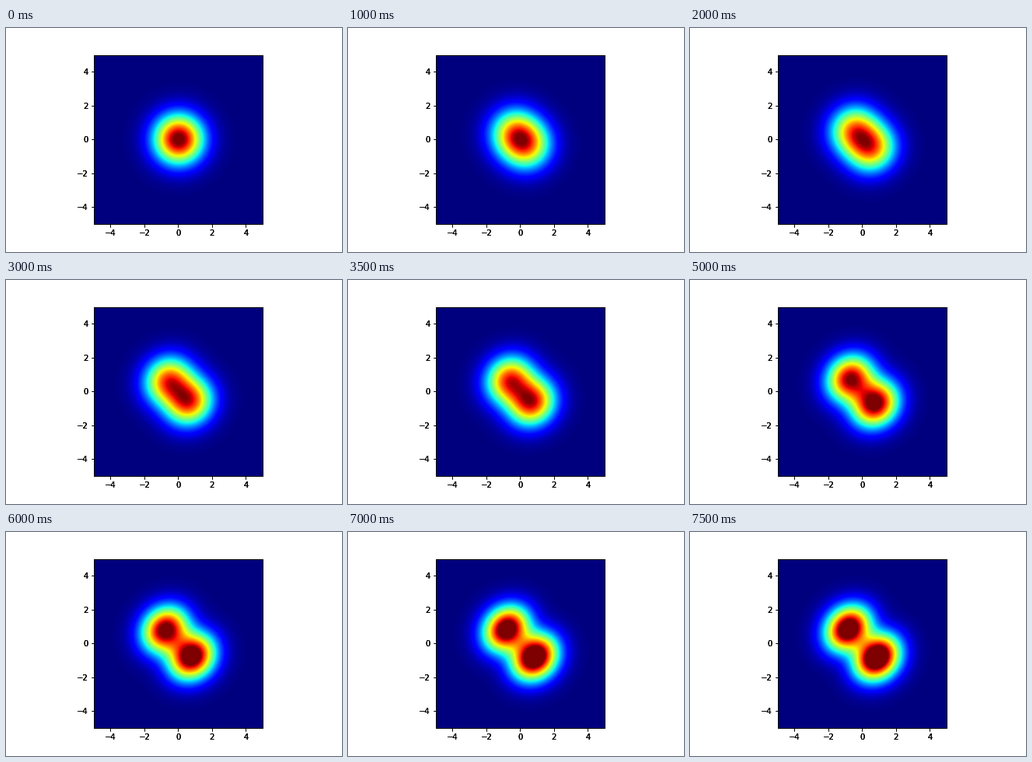
A matplotlib script that plays this animation: 432x288 px, repeating every 8000 ms.

```python
import numpy as np
import matplotlib.pyplot as plt
from matplotlib.animation import FuncAnimation

STEP = 500    # ms per frame
FRAMES = 16
HOLD = 8      # this step repeats the one before it
LABEL_PASSES = 3  # stacked axes give the heavy tick labels

plt.rcParams.update({"font.family": "DejaVu Sans", "font.size": 10})

grid = np.linspace(-5, 5, 217)
x, y = np.meshgrid(grid, grid)
u = (x - y) / np.sqrt(2)
bell = np.exp(-(x**2 + y**2) / 2)


def density(t):
    """Gaussian splitting into two lobes along u, t in seconds."""
    centre = 1 - 0.005 * t**2
    return 1.04 * bell * (centre + 0.011 * t * u + 0.16 * t * u**2)


def time_at(i):
    return (i - 1 if i == HOLD else i) * STEP / 1000


fig = plt.figure(figsize=(6, 4), dpi=72, facecolor="white")
fig.subplots_adjust(left=0.125, right=0.9, bottom=0.125, top=0.88)

ax = fig.add_subplot()
image = ax.imshow(density(0), cmap="jet", vmin=0, vmax=1,
                  origin="lower", extent=(-5, 5, -5, 5))
layers = [ax] + [fig.add_subplot(facecolor="none")
                 for _ in range(LABEL_PASSES - 1)]
for layer in layers:
    layer.set(xlim=(-5, 5), ylim=(-5, 5), aspect="equal",
              xticks=range(-4, 5, 2), yticks=range(-4, 5, 2))


def update(i):
    image.set_data(density(time_at(i)))
    return [image]


anim = FuncAnimation(fig, update, frames=FRAMES, interval=STEP,
                     repeat=True, repeat_delay=0, blit=False)
plt.show()
```
